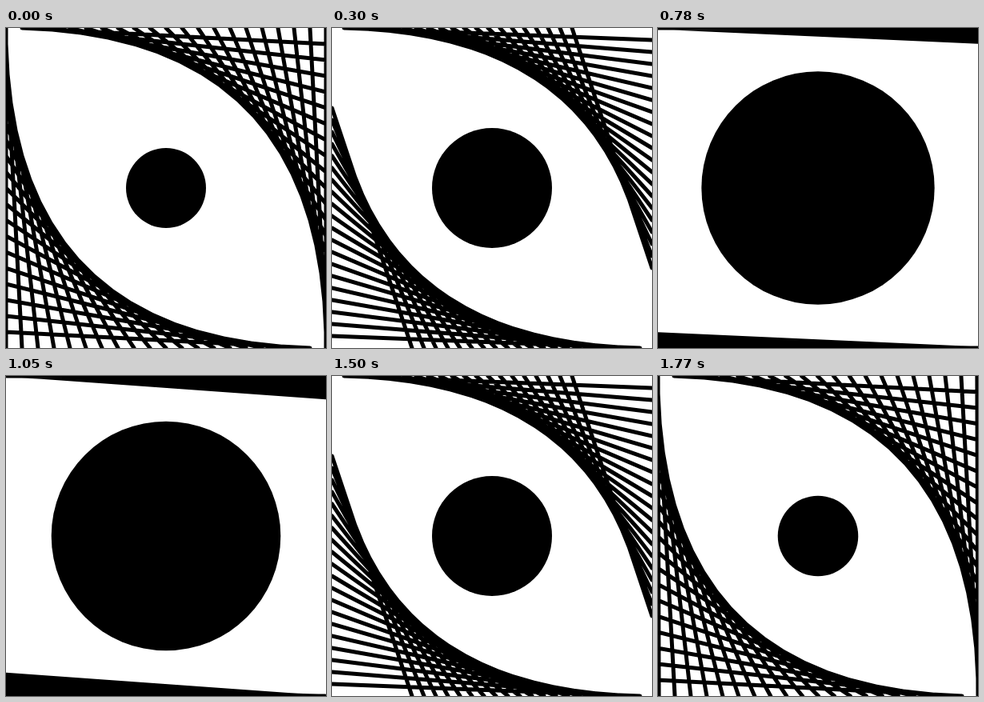
An HTML page that plays this animation: 400 px wide and 400 px high, repeating every 1800 ms.

```html
<!DOCTYPE html>
<html lang="en">
<head>
<meta charset="utf-8">
<title>String eye</title>
<style>
  html, body { margin: 0; width: 100%; height: 100%; overflow: hidden; background: #fff; }
  svg { display: block; width: 100%; height: 100%; }
</style>
</head>
<body>
<svg viewBox="0 0 400 400">
  <path id="strings" fill="none" stroke="#000" stroke-width="5" stroke-linecap="round"/>
  <circle id="pupil" cx="200" cy="200" r="50"/>
</svg>
<script>
  const SIZE = 400, STRINGS = 20, LOOP = 1800, TICK = 30;
  const strings = document.getElementById('strings');
  const pupil = document.getElementById('pupil');

  function draw(time) {
    const tick = Math.floor((time % LOOP) / TICK) * TICK;
    const wave = Math.cos(2 * Math.PI * tick / LOOP);
    const spacing = 10 + 10 * wave;
    let d = '';
    for (let k = 1; k <= STRINGS; k++) {
      const near = k * spacing, far = SIZE - near;
      d += `M${near} 0L${SIZE} ${near}M0 ${far}L${far} ${SIZE}`;
    }
    strings.setAttribute('d', d);
    pupil.setAttribute('r', 100 - 50 * wave);
  }

  function loop(now) {
    draw(now);
    requestAnimationFrame(loop);
  }

  draw(0);
  requestAnimationFrame(loop);
</script>
</body>
</html>
```
